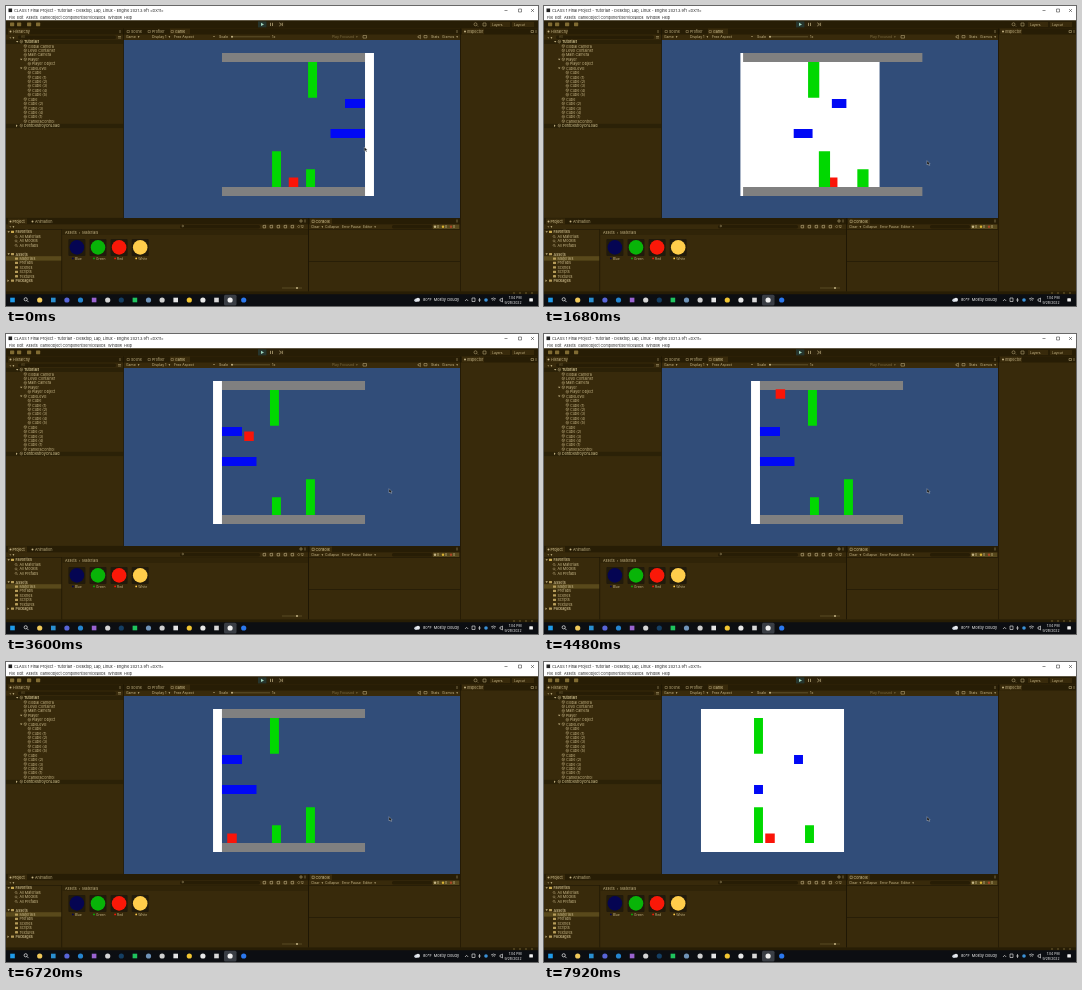
Animation, 532 px wide and 300 px high, one loop 8 s. Source, as an HTML page:

```html
<!DOCTYPE html>
<html lang="en">
<head>
<meta charset="utf-8">
<title>Rotating level in a game editor</title>
<style>
html, body { margin: 0; width: 100%; height: 100%; overflow: hidden; background: #33270a; }
svg { display: block; width: 100vw; height: 100vh; }
text { font-family: "Inter", "Roboto", sans-serif; white-space: pre; }
</style>
</head>
<body>
<svg viewBox="0 0 532 300" xmlns="http://www.w3.org/2000/svg">
  <g id="editor"></g>
  <g id="level"></g>
  <path id="cursor" d="M0 0V4.2L1.1 3.4L1.9 4.9L2.6 4.6L1.9 3.1H3.1Z" fill="#111" stroke="#fff" stroke-width=".3"/>
</svg>
<script>
const LOOP = 8000;
const PANEL = '#382a0b', DARK = '#271d05', LINE = '#181202', INK = '#c4b486', BRIGHT = '#e0d09c', GOLD = '#c9a94f';
const SKY = '#314d79', WHITE = '#f2f2f2';

const rect = (x, y, w, h, fill, extra = '') =>
  `<rect x="${x}" y="${y}" width="${w}" height="${h}" fill="${fill}" ${extra}/>`;
const dot = (x, y, r, fill) => `<circle cx="${x}" cy="${y}" r="${r}" fill="${fill}"/>`;
const text = (x, y, s, fill = INK, size = 3.7, extra = '') =>
  `<text x="${x}" y="${y}" fill="${fill}" font-size="${size}" ${extra}>${s}</text>`;
const stroke = (d, color, w = .5) => `<path d="${d}" fill="none" stroke="${color}" stroke-width="${w}"/>`;
const arrow = (x, y, open) =>
  `<path d="${open ? `M${x} ${y}h2.4l-1.2 1.6z` : `M${x} ${y - .4}v2.4l1.6-1.2z`}" fill="${INK}"/>`;

function windowBars() {
  let s = rect(0, 0, 532, 14.5, '#fff') + rect(2.5, 2.5, 3.6, 3.6, '#222');
  s += text(8, 5.9, 'CLASS 1 Final Project - Tutorial1 - Desktop, Lap, Linux - Engine 2021.3.9f1 &lt;DX11&gt;', '#222', 3.9);
  s += stroke('M498.5 4.5h3M512.5 3h3v3h-3zM525 3l3 3m0-3l-3 3', '#222');
  const menu = { 3: 'File', 11: 'Edit', 20: 'Assets', 34: 'GameObject', 56.5: 'Component', 77: 'Services', 91: 'Jobs', 102: 'Window', 118: 'Help' };
  for (const x in menu) s += text(x, 12.7, menu[x], '#222', 3.7);
  s += rect(0, 14.5, 532, 8, DARK);
  for (const x of [4, 11, 21, 30]) s += rect(x, 16.6, 4.2, 3.6, '#806b32', 'rx=".6"');
  s += rect(252, 15.4, 8.5, 6, '#26352d') + rect(261, 15.4, 17.5, 6, '#2d220a');
  s += `<path d="M255 16.7v3.4l3-1.7z" fill="#9fd6c0"/>` + stroke('M264.5 16.8v3.2m2-3.2v3.2M273.3 16.8l2 1.6-2 1.6m3-3.2v3.2', INK, .7);
  s += stroke('M468 18.3a1.5 1.5 0 1 0 3 0a1.5 1.5 0 1 0-3 0m3 1.2l1 1M477 17h3v3h-3z', INK);
  s += rect(484, 16, 20, 5, PANEL) + text(486, 20, 'Layers', INK, 3.4) + rect(506, 16, 22, 5, PANEL) + text(508, 20, 'Layout', INK, 3.4);
  return s;
}

function hierarchy() {
  let s = rect(0, 22.5, 117.5, 189, PANEL) + rect(0, 22.5, 117.5, 6, DARK) + rect(2, 22.5, 22, 6, PANEL);
  s += text(7, 27, 'Hierarchy') + dot(4.5, 25.5, 1, INK) + text(3, 32.5, '+ ▾') + rect(12, 29.5, 98, 3.6, DARK, 'rx="1.5"');
  s += text(15, 32.4, 'All', '#78683e', 3.2) + stroke('M112 30.5h3m-3 1.5h3M114 24v3', INK);
  const rows = ['Tutorial1', 'Global Camera', 'Level Container', 'Main Camera', 'Player', '>Player Object', 'CubeLevel',
    '>Cube', '>Cube (1)', '>Cube (2)', '>Cube (3)', '>Cube (4)', '>Cube (5)',
    'Cube', 'Cube (2)', 'Cube (3)', 'Cube (4)', 'Cube (1)', 'CameraControl', 'DontDestroyOnLoad'];
  for (const y of [33.7, 117.8]) s += rect(0, y, 117.5, 4.3, '#2b2107');
  rows.forEach((row, i) => {
    const scene = i === 0 || i === 19, child = row[0] === '>';
    const x = scene ? 14 : child ? 22 : 18, y = 35.8 + i * 4.42;
    s += text(x + 4, y + 1.4, row.replace('>', ''), scene ? BRIGHT : INK, 3.7, i === 0 ? 'font-weight="600"' : '');
    s += stroke(`M${x} ${y - 1}l1.3-.6 1.3.6v1.6l-1.3.7-1.3-.7zM${x} ${y - 1}l1.3.6 1.3-.6m-1.3.6v1.7`, INK, .35);
    if (scene || i === 4 || i === 6) s += arrow(x - 4, y - .8, i < 19);
  });
  return s;
}

function gamePanel() {
  let s = rect(117.5, 22.5, 337, 189.5, PANEL) + rect(117.5, 22.5, 337, 6, DARK) + rect(164, 22.5, 20, 6, PANEL);
  s += text(125, 27, 'Scene') + text(146, 27, 'Profiler') + text(169, 27, 'Game', BRIGHT);
  for (const x of [122, 143, 166]) s += stroke(`M${x - 1} 24.5h2.4v2h-2.4z`, INK, .4);
  const tools = { 120: 'Game  ▾', 146: 'Display 1  ▾', 168: 'Free Aspect', 213: 'Scale', 266: '1x', 326: 'Play Focused  ▾', 425: 'Stats', 436: 'Gizmos  ▾' };
  for (const x in tools) s += text(x, 32.4, tools[x], x == 326 ? '#7b6b40' : INK, 3.5);
  s += stroke('M226 30.8h38', '#78683e', .6) + dot(226, 30.8, 1, INK) + stroke('M207 30l1 1 1-1M357 29.5h3.5v2.6h-3.5zM412 30v1.6h1l1.4 1v-3.6l-1.4 1zM418 29.5h3v2.3h-3zM451 24v3', INK);
  return s + rect(117.3, 22.5, .6, 189.5, LINE) + rect(117.9, 34, 336.3, 178, SKY);
}

function inspector() {
  return rect(454.2, 22.5, 78, 262.5, PANEL) + rect(454.2, 22.5, 78, 6, DARK) + rect(456, 22.5, 22, 6, PANEL) +
    dot(459, 25.5, 1, INK) + text(461, 27, 'Inspector') + stroke('M525 24.5h2.5v2h-2.5zM530 24v3', INK) + rect(454.2, 22.5, .6, 263, LINE);
}

function project() {
  let s = rect(0, 212, 302, 73.5, PANEL) + rect(0, 212, 302, 6.3, DARK) + rect(2, 212.4, 19, 6, PANEL);
  s += dot(4.5, 215.5, 1, INK) + text(6.5, 217, 'Project', BRIGHT) + dot(26.5, 215.5, 1, INK) + text(29, 217, 'Animation');
  s += text(3, 222.4, '+ ▾') + rect(174, 219, 80, 3.6, DARK, 'rx="1.5"') + stroke('M176 220a.8.8 0 1 0 1.6 0a.8.8 0 1 0-1.6 0', INK, .4);
  for (const x of [257, 264, 271, 278, 285]) s += stroke(`M${x} 219.5l2.6-.3v2.7h-2.4z`, INK, .6);
  s += text(291, 222.3, '◇12', INK, 3.3) + stroke('M294 214h2v2h-2zM299 213.5v3', INK);
  s += rect(0, 223, 302, .5, LINE) + rect(0, 250.2, 55.5, 4.4, '#59491b');
  const rows = ['Favorites', '>All Materials', '>All Models', '>All Prefabs', '', 'Assets', '>Materials', '>Prefabs', '>Scenes', '>Scripts', '>Textures', 'Packages'];
  rows.forEach((row, i) => {
    if (!row) return;
    const child = row[0] === '>', x = child ? 9 : 5, y = 226 + i * 4.43;
    s += i && i < 4 ? stroke(`M${x} ${y}a1 1 0 1 0 2 0a1 1 0 1 0-2 0m1.8.7l1 1`, INK, .4)
      : rect(x, y - 1.2, 3, 2.3, i ? '#b69c59' : GOLD, 'rx=".3"');
    s += text(x + 4.5, y + 1.4, row.replace('>', ''), INK, 3.7, child ? '' : 'font-weight="600"');
    if (!child) s += arrow(1.5, y - .8, i < 11);
  });
  s += rect(55.5, 223.5, .6, 62, LINE) + rect(56, 223.5, 246, 5.5, '#302408') + text(59, 227.6, 'Assets  ›  Materials');
  ['#050552', '#08b408', '#fa1808', '#ffcd4b'].forEach((color, i) => {
    const x = 62.4 + i * 21.1;
    s += rect(x, 233, 17, 17, '#211a0b', 'rx="1"') + dot(x + 8.5, 241.4, 7.3, color);
    s += dot(x + 4.5, 252.4, .9, color) + text(x + 6.5, 253.8, ['Blue', 'Green', 'Red', 'White'][i], INK, 3.3);
  });
  return s + stroke('M276 282h20', '#78683e') + dot(291, 282, 1, INK);
}

function consolePanel() {
  let s = rect(302.6, 212, 151.6, 73.5, PANEL) + rect(302.6, 212, 151.6, 6.3, DARK) + rect(304, 212.4, 22, 6, PANEL);
  s += stroke('M306 214.2h2.3v2.3h-2.3z', INK) + text(309.5, 217, 'Console', BRIGHT) + rect(303, 223, 151, .5, LINE);
  const tools = { 305: 'Clear  ▾', 319: 'Collapse', 336: 'Error Pause', 357: 'Editor  ▾' };
  for (const x in tools) s += text(x, 222.2, tools[x], INK, 3.4);
  s += rect(386, 219, 40, 3.6, DARK, 'rx="1.5"') + rect(427, 218.6, 26, 4.4, '#57481c');
  [429, 437, 445].forEach((x, i) => s += dot(x, 220.8, 1.2, [INK, '#d8b233', '#a94525'][i]) + text(x + 2, 222.1, '0', BRIGHT, 3.3));
  return s + rect(302, 212, .7, 73.5, LINE) + rect(303, 255, 151, .5, LINE) + stroke('M451 213.5v3', INK);
}

function taskbar() {
  let s = rect(0, 285.5, 532, 3, DARK) + rect(0, 288.2, 532, 11.8, '#0c0e12');
  for (const x of [508, 514, 520, 526]) s += dot(x, 287, .7, '#8b7843');
  const colors = ['#1f9bea', '', '#f0c95a', '#2a8fd0', '#5865d8', '#2585cf', '#9a63d0', '#d5d5d5', '#153f63', '#1fc45e',
    '#6f93b8', '#d0d0d0', '#e4e4e4', '#f2c632', '#e8e8e8', '#d8d8d8', '#f0f0f0', '#2b78ee'];
  s += rect(218, 288.7, 12.5, 10.8, '#3a3e45', 'rx="1.5"');
  colors.forEach((color, i) => {
    const x = 6.5 + i * 13.6;
    if (i === 1) s += stroke(`M${x - 2} 293.3a1.6 1.6 0 1 0 3.2 0a1.6 1.6 0 1 0-3.2 0m2.8 1.1l1.6 1.7`, WHITE, .7);
    else s += i % 3 ? dot(x, 294, 2.6, color) : rect(x - 2.3, 291.7, 4.6, 4.6, color);
  });
  s += dot(410, 294.3, 1.7, '#cfd6df') + dot(412, 293.8, 2, '#e6eaef');
  s += text(417, 295.3, '80°F  Mostly cloudy', WHITE, 3.8);
  s += stroke('M459 295l1.6-1.7 1.6 1.7M466 292h3v3.5h-3zM473.5 292v4m-1.3-2h2.6', WHITE, .6) + dot(480, 294, 1.8, '#3b92d8');
  s += stroke('M485 293q2.5-2 5 0m-4 1.3q1.5-1.2 3 0M494 293h1l1.5-1v4l-1.5-1h-1z', WHITE, .6);
  s += text(515.5, 293, '1:04 PM', WHITE, 3.4, 'text-anchor="end"') + text(515.5, 297.6, '9/28/2022', WHITE, 3.4, 'text-anchor="end"');
  return s + rect(523.3, 292.2, 3.6, 3.4, WHITE, 'rx=".5"');
}

document.getElementById('editor').innerHTML =
  windowBars() + hierarchy() + gamePanel() + inspector() + project() + consolePanel() + taskbar();

// Level boxes: u runs along the white wall, d runs away from it, both from the level's centre.
const GREEN = '#00d800', BLUE = '#0008f5', GRAY = '#808080';
const UNIT = 8.94, H = 8 * UNIT, NEAR = 117.6;
const TOP = 47, BOTTOM = TOP + 16 * UNIT, CEILING = TOP + UNIT, GROUND = BOTTOM - UNIT;
const box = (color, u0, u1, d0, d1, top, bottom) => ({ color, u0, u1, d0, d1, top, bottom });
const block = (color, u, d, depth, top, height) =>
  box(color, u - UNIT / 2, u + UNIT / 2, d - H, d - H + depth, top, top + height * UNIT);
const room = [
  box('#fff', -H, H, -H - UNIT, -H, TOP, BOTTOM),
  box(GRAY, -H, H, -H, H, TOP, CEILING),
  box(GRAY, -H, H, -H, H, GROUND, BOTTOM)
];
const blocks = [
  block(GREEN, -14, 48, UNIT, CEILING, 4),
  block(BLUE, 26, 0, 20, 93, 1),
  block(BLUE, -14, 0, 34.5, 123, 1),
  block(GREEN, -14, 84, UNIT, GROUND - 4 * UNIT, 4),
  block(GREEN, 37, 50, UNIT, GROUND - 2 * UNIT, 2)
];

const clamp = p => Math.min(1, Math.max(0, p));
const smooth = p => p * p * (3 - 2 * p);
const turn = (t, start) => smooth(clamp((t - start) / 855));
const angle = t => Math.PI / 2 * (turn(t, 395) + turn(t, 1440) - turn(t, 6720) - 1);

const rise = p => p * (2 - p), fall = p => p * p, walk = p => p;
const FLOOR = 171.5, LOW = 113.5, HIGH = 83.5;
// time, x in side view, top, vertical easing on the way there
const moves = [
  [2640, 287.5, FLOOR, walk], [3040, 262, 92, rise], [3360, 243, LOW, fall], [3560, 243, LOW, walk],
  [3760, 243, 70, rise], [3960, 228, HIGH, fall], [4160, 227, HIGH, walk], [4440, 236, 55, rise],
  [4490, 236.5, 55.2, walk], [4800, 232, HIGH, fall], [5080, 232, HIGH, walk], [5260, 238, 70, rise],
  [5520, 244, LOW, fall], [5640, 238, LOW, walk], [5760, 223, 106, rise], [5830, 222, LOW, fall],
  [5980, 257, LOW, walk], [6200, 257, FLOOR, fall], [6540, 226, FLOOR, walk]
];

function player(t) {
  const i = moves.findIndex(m => m[0] > t);
  let [, x, y] = moves[i < 0 ? moves.length - 1 : 0];
  if (i > 0) {
    const a = moves[i - 1], b = moves[i], p = (t - a[0]) / (b[0] - a[0]);
    x = a[1] + (b[1] - a[1]) * p;
    y = a[2] + (b[2] - a[2]) * b[3](p);
  }
  return { x, y, u: -1.3 - 1.2 * clamp((t - 2640) / 900), d: x - 287.5 };
}

function playerBox({ u, d, y }) {
  const r = 4.75;
  return box('#fa1408', u - r, u + r, d - r, d + r, y, y + 2 * r);
}

function drawLevel(t) {
  const a = angle(t), c = Math.cos(a), s = Math.sin(a);
  const hero = player(t);
  // The camera stands still in side view and turns about the player.
  const pivot = t < 6600 ? player(0) : hero;
  const project = (u, d) => ({
    x: pivot.x + (u - pivot.u) * c + (d - pivot.d) * s,
    z: (d - pivot.d) * c - (u - pivot.u) * s
  });

  // One upright face, cut where it passes the camera's near plane.
  function face(b, p, q) {
    if (p.z > q.z) [p, q] = [q, p];
    if (p.z >= NEAR) return '';
    const k = q.z > NEAR ? (NEAR - p.z) / (q.z - p.z) : 1;
    const end = p.x + (q.x - p.x) * k;
    const left = Math.min(p.x, end).toFixed(3), right = Math.max(p.x, end).toFixed(3);
    return `M${left} ${b.top}H${right}V${b.bottom}H${left}Z`;
  }
  function solid(b) {
    const side = s > 0 ? b.u0 : b.u1;
    const d = face(b, project(b.u0, b.d1), project(b.u1, b.d1)) + face(b, project(side, b.d0), project(side, b.d1));
    return `<path d="${d}" fill="${b.color}"/>`;
  }
  const depth = b => project((b.u0 + b.u1) / 2, (b.d0 + b.d1) / 2).z;
  const sorted = [...blocks, playerBox(hero)].sort((p, q) => depth(p) - depth(q));
  level.innerHTML = [...room, ...sorted].map(solid).join('');
}

const level = document.getElementById('level'), cursor = document.getElementById('cursor');

function draw(t) {
  drawLevel(t);
  const p = smooth(clamp((t - 80) / 500));
  cursor.setAttribute('transform', `translate(${358.3 + 24.7 * p} ${141 + 13.7 * p})`);
}

const begin = performance.now();
function tick() {
  draw((performance.now() - begin) % LOOP);
  requestAnimationFrame(tick);
}
tick();
</script>
</body>
</html>
```
